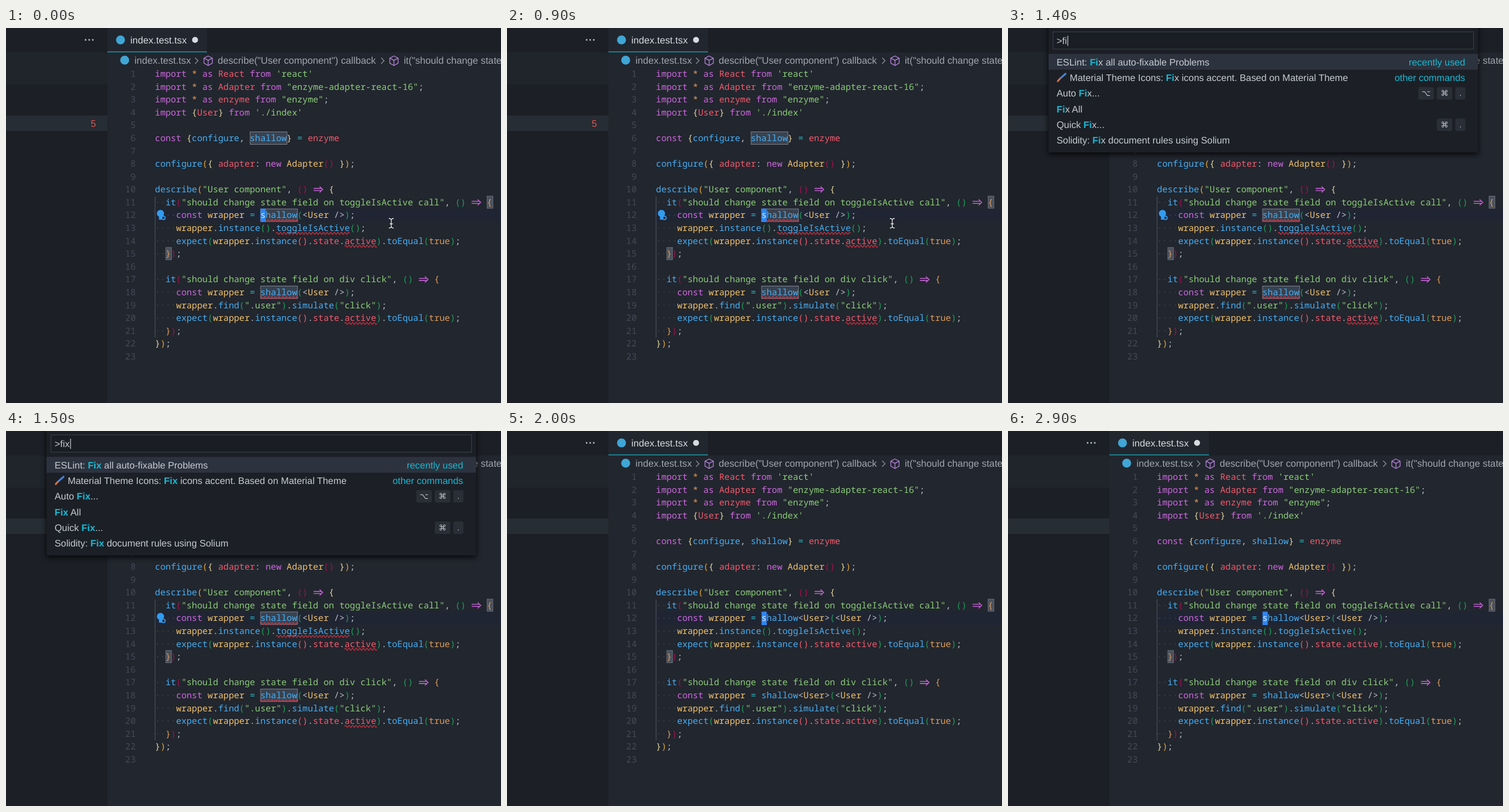
These frames come from a looping animation (830x630 px, 3 s). An HTML page:

```html
<!DOCTYPE html>
<html lang="en">
<head>
<meta charset="utf-8">
<title>Editor quick fix</title>
<style>
  html, body { margin: 0; width: 100%; height: 100%; overflow: hidden; background: #22262e; }
  svg { display: block; }
  text { white-space: pre; text-rendering: geometricPrecision; }
  .code { font: 14.72px "Noto Sans Mono", monospace; }
  .ui { font: 15.9px "Liberation Sans", Arial, sans-serif; fill: #c6cad2; }
  .crumb { font-size: 16.2px; fill: #a0a5ae; }
  .key { font: 13px "Liberation Sans", "DejaVu Sans", sans-serif; fill: #c6cad2; text-anchor: middle; }
  .hit { fill: #19b9d3; font-weight: bold; }
  .note { fill: #19b9d3; text-anchor: end; }
  .panel { filter: drop-shadow(0 3px 5px rgba(0, 0, 0, .85)); }
</style>
</head>
<body>
<svg id="stage" width="830" height="630" viewBox="0 0 830 630"></svg>
<script>
const LOOP = 3000, CW = 8.832, LEFT = 249.8;
const COLOR = {
  p: '#cf68e1', o: '#dd9c5c', r: '#f25a6c', g: '#8bce79', b: '#45aff5', y: '#f1c26b',
  c: '#2bbac5', w: '#bcc2cd', l: '#e3d6a0', d: '#e3a93b', m: '#a80f52', n: '#1d9f5a'
};

const stage = document.getElementById('stage');

function el(tag, attrs, parent = stage, text) {
  const node = document.createElementNS('http://www.w3.org/2000/svg', tag);
  for (const k in attrs) node.setAttribute(k, attrs[k]);
  if (text !== undefined) node.textContent = text;
  return parent.appendChild(node);
}
const group = (parent = stage) => el('g', {}, parent);
const rect = (x, y, width, height, fill, parent, more) =>
  el('rect', { x, y, width, height, fill, ...more }, parent);
const path = (d, stroke, parent, more) =>
  el('path', { d, stroke, fill: 'none', 'stroke-width': 1.3, ...more }, parent);
const dot = (cx, cy, r, fill, parent) => el('circle', { cx, cy, r, fill }, parent);
const ui = (x, y, text, parent, cls = '') => el('text', { x, y, class: 'ui ' + cls }, parent, text);
const colX = c => LEFT + c * CW;
const lineY = n => 77 + 21.59 * (n - 1);
const show = (node, on) => { node.style.display = on ? '' : 'none'; };

// Each piece of a line starts with "~" and a colour letter; "~a" is a double arrow.
function codeLine(n, src, parent) {
  const indent = src.search('~'), y = lineY(n);
  let col = indent;
  for (let i = 0; i < indent; i++) dot(colX(i + .5), y, .9, '#414752', parent);
  for (const part of src.slice(indent + 1).split('~')) {
    const text = part.slice(1);
    if (part[0] === 'a') {
      const x = colX(col);
      path(`M${x + 1} ${y - 1.8}h13.2M${x + 1} ${y + 1.8}h13.2M${x + 11} ${y - 5}L${x + 16.3} ${y}L${x + 11} ${y + 5}`,
        COLOR.p, parent);
      col += 2;
    } else {
      el('text', { x: colX(col), y: y + 5, class: 'code', fill: COLOR[part[0]] }, parent, text);
      col += text.length;
    }
  }
}

function squiggle(n, col, len, parent) {
  const waves = Math.round(len * CW / 3);
  path(`M${colX(col)} ${lineY(n) + 9}q1.5 -3.4 3 0` + 't3 0'.repeat(waves - 1), '#e0303f', parent,
    { 'stroke-width': 1.2 });
}

function wordBox(n, col, len, parent) {
  rect(colX(col) + .5, lineY(n) - 10.5, len * CW, 21, '#3a424f', parent, { stroke: '#7b818d' });
}

function cube(x, y) {
  path(`M${x} ${y - 8}l7 3.6v8.4l-7 4l-7 -4v-8.4zM${x - 7} ${y - 4.4}l7 3.8l7 -3.8M${x} ${y - .6}v8.6`, '#b180d7');
}
const chevron = x => path(`M${x - 3} 50l5 5l-5 5`, '#8d929b');

// Side bar and tabs
rect(0, 0, 830, 630, '#22262e');
rect(0, 0, 170, 630, '#1c1f26');
rect(0, 41, 170, 54, '#20242b');
rect(0, 147, 170, 26, '#262d34');
rect(337, 0, 493, 41, '#1c1f26');
rect(170, 39.5, 167, 1.2, '#17b3c3');
for (const x of [133.5, 139.5, 145.5]) dot(x, 20, 1.4, '#b9bec7');
dot(192, 20, 7.5, '#3fa6d6');
ui(208.5, 26, 'index.test.tsx', stage, 'crumb').style.fill = '#d7dae0';
dot(317, 20, 5, '#d7dae0');
dot(199, 54, 7.5, '#3fa6d6');
ui(215.5, 60, 'index.test.tsx', stage, 'crumb');
chevron(320);
cube(339, 55);
ui(355, 60, 'describe("User component") callback', stage, 'crumb');
chevron(632);
cube(650.5, 55);
ui(667, 60, 'it("should change state field on', stage, 'crumb');

// Editor
rect(250, lineY(12) - 11, 580, 22.5, '#202534');
path('M250 283V520', '#4e5561', stage, { 'stroke-width': 1 });
for (const [n, col] of [[11, 63], [15, 2]])
  rect(colX(col) + .5, lineY(n) - 10.5, CW + .8, 20.5, '#4a515c', stage, { stroke: '#666c77' });
for (let n = 1; n <= 23; n++)
  el('text', { x: 217.5, y: lineY(n) + 5, class: 'code', fill: '#444a56', 'text-anchor': 'end' }, stage, n);

const before = group(), after = group(), errors = group();
wordBox(6, 18, 7, before);

const expectLine = '    ~bexpect~n(~ywrapper~w.~binstance~r()~w.~rstate~w.~ractive~n)~w.~btoEqual~n(~otrue~n)~w;';
const callLine = type => `    ~pconst ~ywrapper ~c= ~bshallow${type}~n(~w<~yUser ~w/>~n)~w;`;
const code = {
  1: '~pimport ~o* ~pas ~rReact ~pfrom ~g\'react\'',
  2: '~pimport ~o* ~pas ~rAdapter ~pfrom ~g"enzyme-adapter-react-16"~w;',
  3: '~pimport ~o* ~pas ~renzyme ~pfrom ~g"enzyme"~w;',
  4: '~pimport ~l{~rUser~l} ~pfrom ~g\'./index\'',
  6: '~pconst ~l{~bconfigure~w, ~bshallow~l} ~c= ~renzyme',
  8: '~bconfigure~d(~l{ ~radapter~w: ~pnew ~yAdapter~m() ~l}~d)~w;',
  10: '~bdescribe~d(~g"User component"~w, ~m() ~a~l {',
  11: '  ~bit~m(~g"should change state field on toggleIsActive call"~w, ~n() ~a~o {',
  13: '    ~ywrapper~w.~binstance~n()~w.~btoggleIsActive~n()~w;',
  14: expectLine,
  15: '  ~o}~m)~w;',
  17: '  ~bit~m(~g"should change state field on div click"~w, ~n() ~a~o {',
  19: '    ~ywrapper~w.~bfind~n(~g".user"~n)~w.~bsimulate~n(~g"click"~n)~w;',
  20: expectLine,
  21: '  ~o}~m)~w;',
  22: '~l}~d)~w;'
};
for (const n in code) codeLine(+n, code[n], stage);

for (const n of [12, 18]) {
  wordBox(n, 20, 7, before);
  codeLine(n, callLine(''), before);
  squiggle(n, 20, 7, before);
  codeLine(n, callLine('~w<~yUser~w>'), after);
}
const pending = group(errors);
squiggle(18, 20, 13, pending);
squiggle(13, 23, 14, errors);
squiggle(14, 36, 6, errors);
squiggle(20, 36, 6, errors);
ui(142, 165.5, '5', errors).style.fill = '#e5534f';

// Light bulb with its small badge
dot(259, 311.5, 6, '#319cf0', errors);
rect(256.5, 316.5, 4.5, 5.5, '#319cf0', errors);
el('circle', { cx: 264, cy: 319, r: 2.9, fill: '#22262e', stroke: '#319cf0', 'stroke-width': 1.6 }, errors);

const block = group();
rect(colX(20) + .3, lineY(12) - 11, CW, 22.5, '#2f86f2', block);
el('text', { x: colX(20), y: lineY(12) + 5, class: 'code', fill: '#dcebff' }, block, 's');

const pointer = group();
for (const [stroke, width] of [['#15181d', 3], ['#eef0f3', 1.3]])
  path('M-4 -8q4 0 4 3v10q0 3 -4 3M4 -8q-4 0 -4 3v10q0 3 4 3M-2.5 1h5', stroke, pointer, { 'stroke-width': width });

// Command palette: [label, keys, note]
const longList = [
  ['ESLint: Fix all auto-fixable Problems', '', 'recently used'],
  ['Preferences: Open Settings (JSON)'],
  ['Preferences: Color Theme', '⌘K ⌘T'],
  ['Merge Conflict: Accept All Incoming'],
  ['Merge Conflict: Accept All Current'],
  ['File: Save without Formatting', '⌘K S'],
  ['Format Document', '⇧⌥F'],
  ['Preferences: Open Keyboard Shortcuts', '⌘K ⌘S'],
  ['Preferences: Open Keyboard Shortcuts (JSON)'],
  ['Preferences: Open Default Keyboard Shortcuts (JSON)'],
  ['Preferences: Open User Settings'],
  ['File: New File']
];
const fixList = [
  longList[0],
  ['Material Theme Icons: Fix icons accent. Based on Material Theme', '', 'other commands'],
  ['Auto Fix...', '⌥⌘.'],
  ['Fix All'],
  ['Quick Fix...', '⌘.'],
  ['Solidity: Fix document rules using Solium']
];

function keys(spec, y, parent) {
  let right = 767;
  for (const ch of [...spec].reverse()) {
    if (ch === ' ') { right -= 6; continue; }
    const w = ch === '.' ? 17 : /[A-Z]/.test(ch) ? 23 : 26;
    rect(right - w, y - 10.5, w, 21, '#2a2e36', parent, { rx: 3 });
    el('text', { x: right - w / 2, y: y + 4.7, class: 'key' }, parent, ch);
    right -= w + 5;
  }
}

function palette(query, list) {
  const g = group(), long = list === longList;
  rect(68, -12, 720, long ? 379 : 221, '#1c1f26', g, { class: 'panel' });
  rect(75.5, 6.5, 705, 29, '#1a1d23', g, { stroke: '#3b404a' });
  rect(68, 43.5, long ? 709 : 720, 26.5, '#2c333e', g);
  if (long) {
    rect(777, 43.5, 11, 24, '#343a45', g);
    rect(68, 307.5, 720, 26.4, '#22262e', g);
  }
  const typed = ui(81.5, 27, '>' + query, g);
  rect(82.5 + typed.getComputedTextLength(), 13, 1.1, 17, '#d7dae0', g);

  list.forEach(([label, combo, note], i) => {
    const y = 57 + 26.36 * i, brush = label.startsWith('Material');
    if (brush) {
      path(`M88 ${y + 1}L96.5 ${y - 6.5}`, '#4a86d8', g, { 'stroke-width': 3, 'stroke-linecap': 'round' });
      path(`M83.5 ${y + 6}L87 ${y + 2}`, '#d0764a', g, { 'stroke-width': 3, 'stroke-linecap': 'round' });
    }
    const at = label.toLowerCase().indexOf(query), end = at + query.length;
    const row = ui(brush ? 103.5 : 81.5, y + 5.5, label.slice(0, at), g);
    el('tspan', { class: 'hit' }, row, label.slice(at, end));
    el('tspan', {}, row, label.slice(end));
    if (combo) keys(combo, y, g);
    if (note) ui(766.5, y + 5.5, note, g, 'note');
  });
  return g;
}

const OPEN = 1100, FIXED = 1700, CLEAN = 2000;
const panels = [
  [1100, '', longList], [1200, 'f', longList], [1300, 'fi', fixList], [1500, 'fix', fixList]
].map(([start, query, list], i, all) => ({
  start, end: i + 1 < all.length ? all[i + 1][0] : FIXED, node: palette(query, list)
}));
const blockOn = [[0, 200], [700, OPEN], [FIXED, 2200], [2700, LOOP]];
const within = (t, [a, b]) => t >= a && t < b;

function draw(t) {
  show(before, t < FIXED);
  show(after, t >= FIXED);
  show(errors, t < CLEAN);
  show(pending, t >= FIXED);
  show(block, blockOn.some(span => within(t, span)));
  for (const p of panels) show(p.node, within(t, [p.start, p.end]));

  const k = Math.min(1, Math.max(0, (t - 2200) / 200)), move = k * k * (3 - 2 * k);
  show(pointer, t < OPEN || within(t, [2200, 2600]));
  pointer.setAttribute('transform', `translate(${646 - 72 * move} ${328 + 72 * move})`);
}

const begin = performance.now();
function tick() {
  draw((performance.now() - begin) % LOOP);
  requestAnimationFrame(tick);
}
tick();
</script>
</body>
</html>
```
